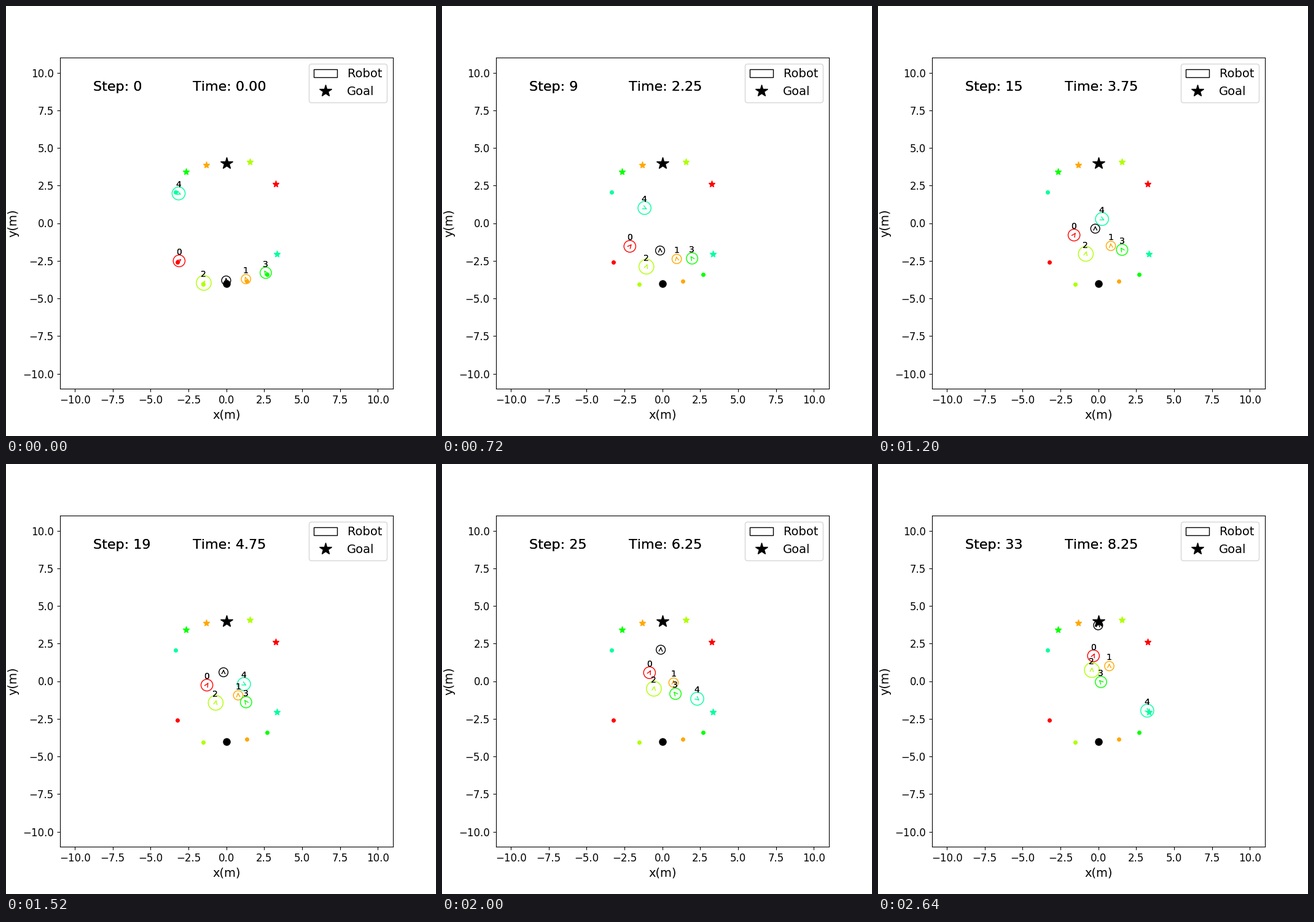
Write a matplotlib script that moves like this. It is 700 px wide and 700 px high and loops after 2.72 s.

```python
import matplotlib.pyplot as plt
import numpy as np
from matplotlib.animation import FuncAnimation
from matplotlib.lines import Line2D
from matplotlib.patches import ArrowStyle, Circle, FancyArrowPatch

STEPS = 34
DT = 0.25
ARROW_LEN = 0.3
MEET = 19  # step from which an unhindered agent heads straight for its goal
LAST = STEPS - 1

# radius, last step of the curved path, evenly spaced key points along it
ROBOT = 0.3, MEET, [(0, -4), (-.1, -2.6), (-.19, -1.015), (-.19, .59)]
HUMANS = [
    (0.39, LAST, [(-3.24, -2.6), (-2.02, -1.38), (-1.085, .1), (-.325, 1.68)]),
    (0.31, LAST, [(1.345, -3.87), (.915, -2.185), (.755, -.565), (.72, 1)]),
    (0.49, LAST, [(-1.55, -4.07), (-1, -2.71), (-.635, -1.025), (-.43, .735)]),
    (0.375, LAST, [(2.68, -3.415), (1.873, -2.21), (1.112, -1.15), (.172, -.055)]),
    (0.43, MEET, [(-3.345, 2.06), (-1.95, 1.4), (-.39, .6), (1.16, -.195)]),
]


def trajectory(points, end):
    """Positions from one step before the beginning up to the last step."""
    degree = len(points) - 1
    coef = np.polyfit(np.linspace(-1, end, len(points)), points, degree)
    path = list(np.vander(np.arange(-1, end + 1), degree + 1) @ coef)
    goal = -np.array(points[0])
    # Unit speed towards the goal, slowing down within one metre.
    while len(path) <= STEPS:
        gap = goal - path[-1]
        path.append(path[-1] + DT * gap / max(1, np.hypot(*gap)))
    return np.array(path)


class Agent:
    def __init__(self, ax, radius, end, points, color, dot, star, label=None):
        self.path = trajectory(points, end)
        start = np.array(points[0])
        self.circle = ax.add_patch(Circle(start, radius, fill=False, color=color))
        style = ArrowStyle("->", head_length=4, head_width=2)
        self.arrow = ax.add_patch(
            FancyArrowPatch((0, 0), (1, 1), color=color, arrowstyle=style))
        marker(ax, start, color, "o", dot)
        self.goal = marker(ax, -start, color, "*", star)
        self.label = None if label is None else heavy_text(ax, 0, 0, label, fontsize=10)

    def update(self, step):
        prev, pos = self.path[step], self.path[step + 1]
        way = pos - prev
        self.circle.center = pos
        self.arrow.set_positions(pos, pos + ARROW_LEN * way / np.hypot(*way))
        if self.label:
            self.label.set_position(pos + (-0.2, 0.4))


def marker(ax, pos, color, shape, size):
    line = Line2D([pos[0]], [pos[1]], color=color, marker=shape,
                  linestyle="None", markersize=size)
    ax.add_artist(line)
    return line


def heavy_text(ax, x, y, text, **kw):
    """Text that is painted twice, which hardens its edges."""
    artist = ax.text(x, y, text, color="black", **kw)
    ax.add_artist(artist)
    return artist


plt.rcParams["text.kerning_factor"] = 6  # kerning in whole pixels
fig, ax = plt.subplots(figsize=(7, 7), dpi=100)
ax.tick_params(labelsize=12)
ax.set_xlim(-11, 11)
ax.set_ylim(-11, 11)
ax.set_xlabel("x(m)", fontsize=14)
ax.set_ylabel("y(m)", fontsize=14)

cmap = plt.get_cmap("hsv", 10)
robot = Agent(ax, *ROBOT, "black", 8, 15)
agents = [robot] + [Agent(ax, *human, cmap(i), 4, 8, str(i))
                    for i, human in enumerate(HUMANS)]
ax.legend([robot.circle, robot.goal], ["Robot", "Goal"],
          loc="upper right", fontsize=14)
step_text = heavy_text(ax, 0.1, 0.9, "", fontsize=16, transform=ax.transAxes)
time_text = heavy_text(ax, 0.4, 0.9, "", fontsize=16, transform=ax.transAxes)


def update(step):
    for agent in agents:
        agent.update(step)
    step_text.set_text(f"Step: {step}")
    time_text.set_text(f"Time: {step * DT:.2f}")
    return []


anim = FuncAnimation(fig, update, frames=STEPS, interval=80, repeat=True)
plt.show()
```
